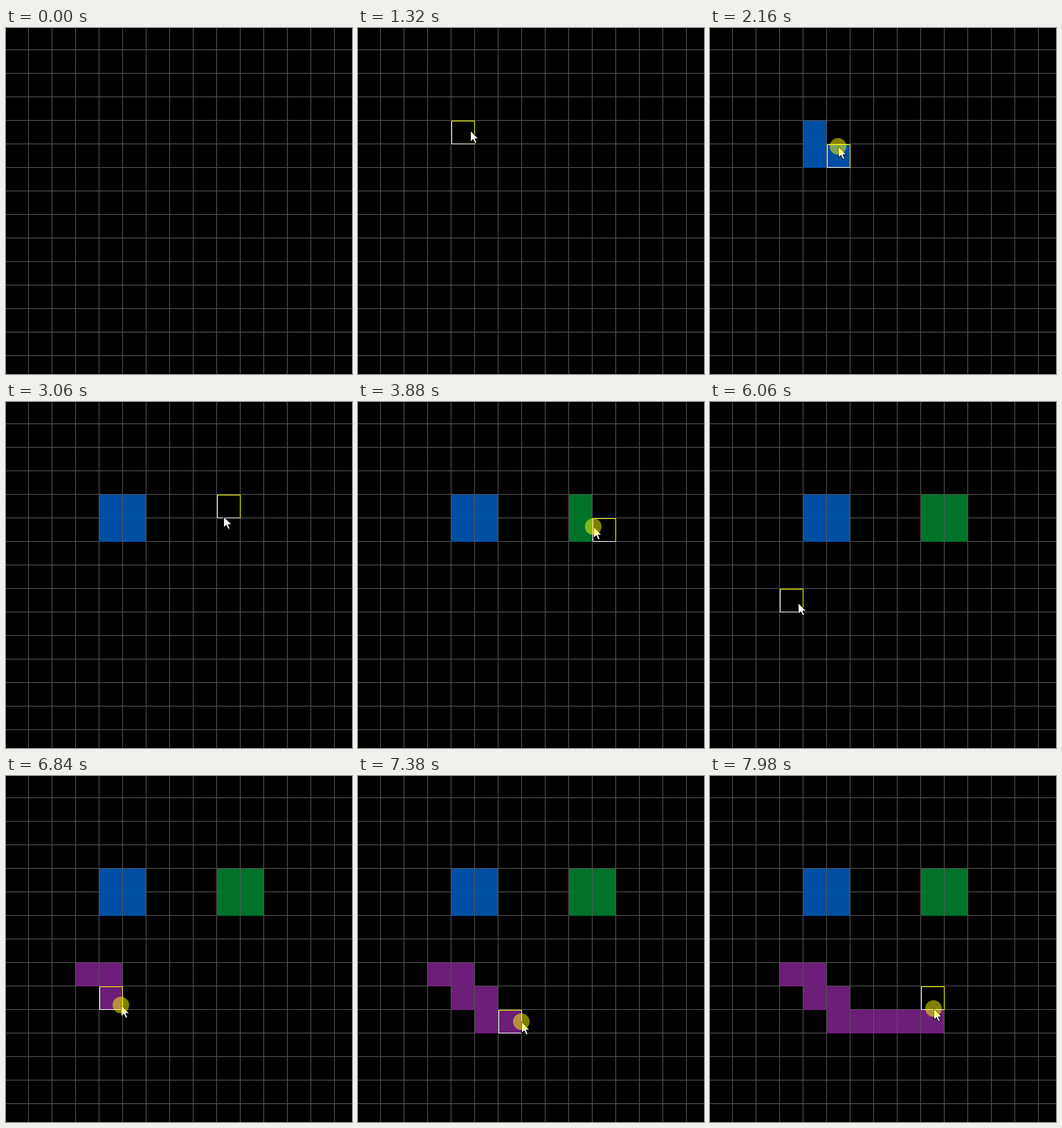
Animation of 500x500 px, one loop 8000 ms. Source, as an HTML page with a canvas:

```html
<!DOCTYPE html>
<html>
<head>
<meta charset="utf-8">
<style>
html, body { margin: 0; height: 100%; overflow: hidden; background: #000; }
canvas { display: block; }
</style>
</head>
<body>
<canvas id="stage" width="500" height="500"></canvas>
<script>
const ctx = document.getElementById('stage').getContext('2d');
const LOOP = 8000, STEP = 20, CELL = 34, LEFT = 135, TOP = 134;

const linear = p => p;
const easeOut = p => 1 - (1 - p) ** 2;
const smooth = p => p * p * (3 - 2 * p);

// Pointer moves: start, end, easing, Bezier control points
const moves = [
  [420, 1250, easeOut, [[496, 496], [164, 147.5]]],
  [1270, 1420, smooth, [[164, 147.5], [157, 150]]],
  [1640, 2350, smooth, [[157, 150], [150, 192], [192, 192], [186, 155]]],
  [2610, 3060, smooth, [[186, 155], [314, 165]]],
  [3450, 4150, smooth, [[314, 165], [314, 190], [350, 190], [347, 161]]],
  [4930, 5650, smooth, [[347, 161], [133, 312]]],
  [5890, 6060, smooth, [[133, 312], [127, 290]]],
  [6350, 7150, smooth, [[127, 290], [186, 352]]],
  [7150, 7380, linear, [[186, 352], [236, 355]]],
  [7380, 7980, linear, [[236, 355], [265, 358], [318, 356], [323, 336]]]
];

// Mouse button held: from, to, colour
const presses = [
  [1620, 2440, '#0054b0'],
  [3440, 4280, '#007a2d'],
  [6340, LOOP, '#742080']
];

function bezier(points, p) {
  while (points.length > 1) {
    points = points.slice(1).map((b, i) => b.map((v, k) => points[i][k] + (v - points[i][k]) * p));
  }
  return points[0].map(Math.round);
}

function pointerAt(t) {
  const [start, end, ease, points] = moves.filter(m => m[0] <= t).pop();
  return bezier(points, ease(Math.min(1, (t - start) / (end - start))));
}

const pressAt = t => presses.find(([from, to]) => t >= from && t < to);
const snap = (v, origin) => origin + Math.floor((v - origin) / CELL) * CELL;
const cellAt = ([x, y]) => [snap(x, LEFT), snap(y, TOP)];

function rect(color, x, y, w, h) {
  ctx.fillStyle = color;
  ctx.fillRect(x, y, w, h);
}

function drawGrid() {
  rect('#000', 0, 0, 500, 500);
  for (let i = 0; i < 14; i++) {
    rect('#555', 32 + i * CELL, 0, 1, 500);
    rect('#555', 0, 31 + i * CELL, 500, 1);
  }
}

function drawPainted(t) {
  const painted = new Map();
  for (let s = 0; s < t; s += STEP) {
    const press = pressAt(s);
    if (press) painted.set(cellAt(pointerAt(s)).join(), press[2]);
  }
  ctx.globalAlpha = 0.94;
  for (const [key, color] of painted) {
    const [x, y] = key.split(',').map(Number);
    rect(color, x, y, CELL - 1, CELL);
  }
  ctx.globalAlpha = 1;
}

function drawHover(x, y) {
  rect('#fff', x, y, 1, CELL);
  rect('#fff', x, y + CELL - 1, CELL, 1);
  rect('#ff0', x, y, CELL, 1);
  rect('#ff0', x + CELL - 1, y, 1, CELL);
}

const arrow = new Path2D('M.5.5V16.5L4.3 13L7 18.8L9.6 17.7L7 12H12Z');

function drawPointer(x, y, pressed) {
  ctx.save();
  ctx.translate(x, y);
  ctx.fillStyle = '#fff';
  ctx.strokeStyle = '#000';
  ctx.fill(arrow);
  ctx.stroke(arrow);
  if (pressed) {
    ctx.fillStyle = 'rgba(255,255,0,.5)';
    ctx.beginPath();
    ctx.arc(0, 0, 12, 0, Math.PI * 2);
    ctx.fill();
  }
  ctx.restore();
}

function draw(now) {
  const t = Math.floor(now % LOOP / STEP) * STEP;
  drawGrid();
  drawPainted(t);
  if (t >= 440) {
    const pos = pointerAt(t);
    drawHover(...cellAt(pos));
    drawPointer(...pos, pressAt(t));
  }
  requestAnimationFrame(draw);
}
requestAnimationFrame(draw);
</script>
</body>
</html>
```
